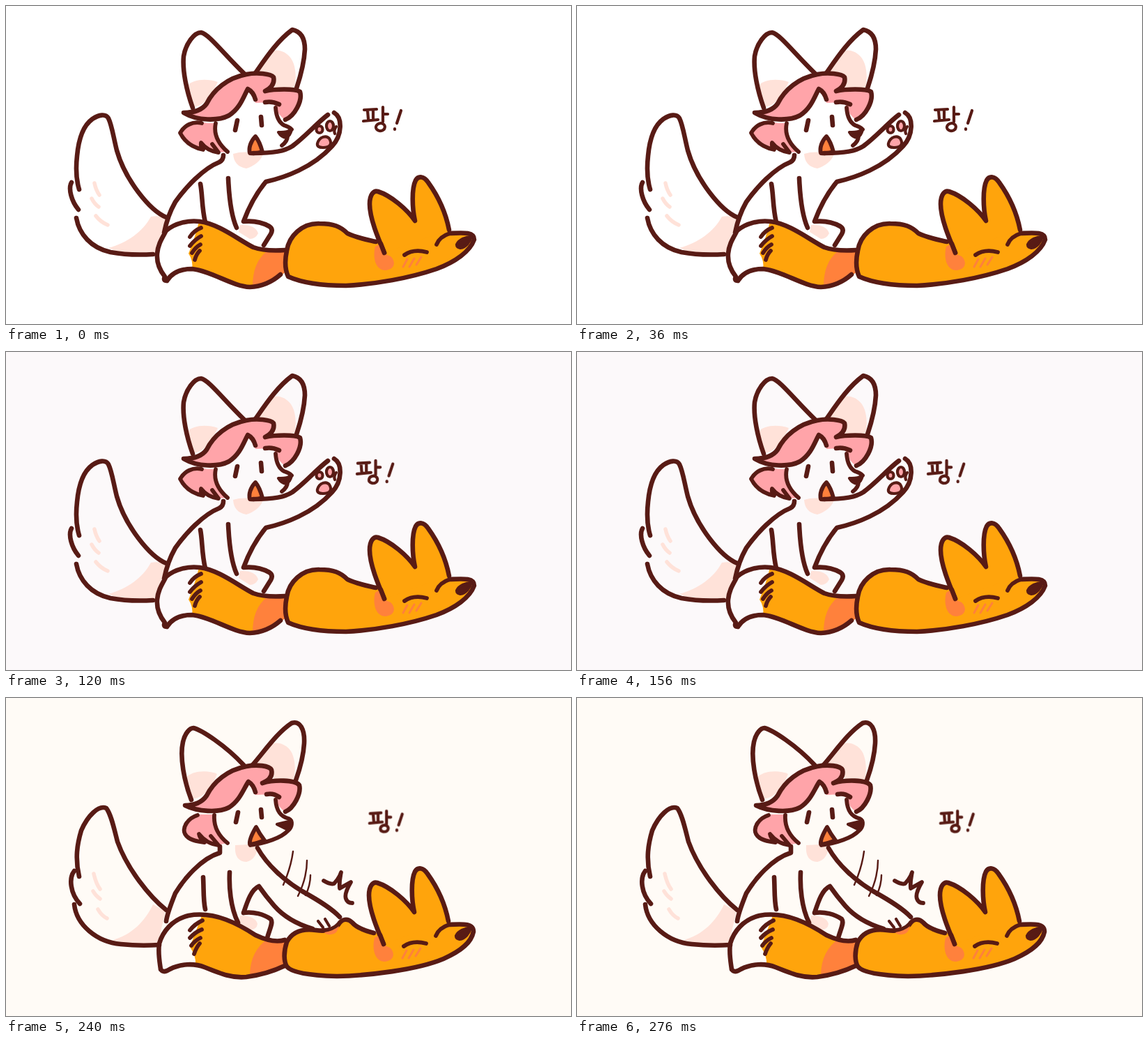
An HTML page that plays this animation: 811 px wide and 456 px high, repeating every 0.3 s.

```html
<!DOCTYPE html>
<html lang="ko">
<head>
<meta charset="utf-8">
<title>팡!</title>
<style>
html, body { margin: 0; width: 100%; height: 100%; overflow: hidden; }
svg { display: block; width: 100vw; height: 100vh; animation: paper .3s step-end infinite; }
path, ellipse { fill: none; stroke-linecap: round; stroke-linejoin: round; }
.ink { stroke: #581b15; stroke-width: 6.6; }
.mid { stroke-width: 5.8; }
.fine { stroke-width: 4.2; }
.thin { stroke-width: 2.4; }
.orange { fill: #ffa40c; }
.rust { fill: #ff813c; }
.pink { fill: #ffa4a9; }
.peach { fill: #ffe2d9; }
.dark { fill: #581b15; }
.tuft { stroke: #ffe2d9; stroke-width: 5.5; }
.blush { stroke: #ff813c; stroke-width: 3; }

.raise { animation: raise .3s step-end infinite; }
.slap { animation: slap .3s step-end infinite; }
.head { animation: nudge .3s step-end infinite; }
.word { vector-effect: non-scaling-stroke; animation: word .3s step-end infinite; }
.whoosh1 { animation: first .3s step-end infinite; }
.whoosh2 { animation: rest .3s step-end infinite; }

@keyframes paper {
  0% { background: #fff; }
  20% { background: #fcf9fd; }
  40% { background: #fcf9fa; }
  60% { background: #f9fffe; }
  80%, 100% { background: #fffbf6; }
}
@keyframes raise {
  0%, 40% { visibility: visible; }
  20%, 60%, 100% { visibility: hidden; }
}
@keyframes slap {
  0%, 40% { visibility: hidden; }
  20%, 60%, 100% { visibility: visible; }
}
@keyframes first {
  0%, 40%, 100% { visibility: hidden; }
  20% { visibility: visible; }
}
@keyframes rest {
  0% { visibility: hidden; }
  60%, 100% { visibility: visible; }
}
@keyframes nudge {
  0%, 40% { transform: none; }
  20%, 60%, 100% { transform: translate(-1px, -1px); }
}
@keyframes word {
  0% { transform: none; }
  20% { transform: translate(32.6px, 11.5px) scale(.95); }
  40% { transform: translate(16.6px, 18px) scale(.95); }
  60%, 100% { transform: translate(75.5px, 36px) scale(.87); }
}
</style>
</head>
<body>
<svg viewBox="0 0 811 456" role="img" aria-label="팡!">
  <!-- paw up -->
  <g class="raise">
    <path class="peach" d="M260 115C268 104 290 104 304 109L296 125Q285 142 270 145Z"/>
    <path class="peach" d="M376 67C390 58 408 67 413 83C417 96 416 108 414 118L384 117L386 104L358 96Z"/>
    <path class="peach" d="M326 212C338 208 355 209 369 213Q363 227 345 233Q327 230 326 212Z"/>
    <path class="peach" d="M147 347C175 339 196 324 208 302Q220 300 231 304L222 330L214 354Q170 358 147 347Z"/>
    <path class="peach" d="M336 314Q358 313 362 326Q358 334 350 334L334 324Z"/>
    <path class="tuft" d="M127 254Q129 264 134 271M123 276Q127 284 133 288M129 301Q136 310 146 314"/>

    <path class="ink" d="M268 146C259 121 253 92 255 72C258 54 270 38 280 38C291 40 312 68 342 97M358 96C372 76 389 50 411 34C421 36 429 43 429 62C428 82 422 103 417 118"/>
    <path class="ink" d="M230 303C206 293 171 249 159 207C154 187 152 171 147 161C143 154 133 156 124 162C110 172 104 193 102 215C100 233 101 250 105 263M94 253C89 262 94 280 104 292M101 304C105 327 122 347 150 353Q177 358 211 356"/>
    <path class="ink" d="M312 214Q312 221 306 224C283 233 258 260 243 281C235 295 230 310 227 325M279 255C282 270 281 290 286 310M319 247C320 270 322 298 331 318"/>

    <path class="pink" d="M290 168C275 165 255 169 250 182C257 196 268 203 283 207L281 198Q292 210 305 210L318 209C303 195 298 180 301 168Z"/>
    <path class="ink mid" d="M281 168C268 165 256 171 250 182C257 196 268 203 283 206Q279 203 280 196Q289 208 305 210L296 198M301 168C298 182 303 196 318 209"/>
    <path class="pink" d="M255 153C270 153 281 150 288 140C298 120 318 103 345 98C360 95 380 97 384 102C386 112 380 118 372 122C385 119 415 118 422 123C426 136 414 158 401 163Q390 157 387 143Q380 137 358 139Q357 123 347 119C341 130 336 147 320 157C305 165 275 165 255 153Z"/>
    <path class="ink" d="M372 122C385 119 415 118 422 123C426 136 414 158 401 163M372 138Q382 136 392 141M372 122C380 118 386 112 384 102C380 97 360 95 345 98C318 103 298 120 288 140C281 150 270 153 255 153C275 165 305 165 320 157C336 147 341 130 347 119Q355 123 358 134"/>

    <path class="ink" d="M332 164L329 178M366 159L367 171"/>
    <path class="ink mid" d="M387 146C388 160 392 167 399 171Q406 173 410 177"/>
    <path class="ink fine dark" d="M391 181Q402 182 410 177Q408 186 402 189Q395 188 391 181Z"/>
    <path class="ink mid" d="M404 187Q404 194 396 200"/>
    <path class="ink mid rust" d="M358 187C351 194 348 204 350 211Q360 212 368 209Q364 194 358 187Z"/>
    <path class="ink" d="M355 211C385 211 400 208 411 201C430 187 446 168 462 156M471 153C483 160 483 185 468 201C440 232 400 246 373 252C358 270 348 290 341 309Q362 307 378 316Q384 320 380 327L370 343"/>
    <path class="ink fine pink" d="M447 197C450 187 460 185 464 190C469 198 465 203 455 203Q446 203 447 197Z"/>
    <ellipse class="ink fine pink" cx="450" cy="177" rx="4.5" ry="5"/>
    <ellipse class="ink fine pink" cx="465" cy="172" rx="5" ry="7"/>
    <path class="ink fine" d="M474 173Q470 178 472 183"/>

    <path class="orange" d="M277 309C305 312 335 336 355 346Q372 352 403 350L402 381L394 385Q372 403 352 403C325 402 300 382 267 378Q269 365 262 355Q272 330 277 309Z"/>
    <path class="rust" d="M375 351C360 363 354 380 354 402Q374 403 402 381L403 350Z"/>
    <path class="ink" d="M231 394C239 381 252 377 267 377C295 380 325 402 350 403C372 402 385 393 394 385M231 394Q225 394 228 388C220 378 216 367 217 355C218 342 224 333 230 322C243 311 262 307 278 309C305 312 335 336 355 346Q372 352 401 350"/>
    <path class="ink mid" d="M280 318Q270 322 264 331M280 330Q271 335 264 344M279 342Q272 346 267 354M278 351Q273 356 271 364"/>
    <path class="ink orange" d="M531 338C518 335 505 333 490 326C480 316 470 312 450 312C425 311 406 330 403 351C400 365 401 379 405 388C425 397 455 401 488 401C530 399 580 390 618 377C645 367 666 352 672 335C672 324 658 325 637 326"/>
  </g>

  <!-- paw down -->
  <g class="slap">
    <path class="peach" d="M258 115C266 104 290 103 303 109L296 125Q285 142 267 145Z"/>
    <path class="peach" d="M378 67C390 60 408 68 412 83C416 95 415 108 413 118L384 117L384 102L355 96Z"/>
    <path class="peach" d="M329 211Q327 234 345 235Q358 232 361 216L352 210Z"/>
    <path class="peach" d="M153 347C180 340 200 320 211 296L229 306Q223 330 218 353Q180 356 153 347Z"/>
    <path class="peach" d="M336 312Q358 312 361 324Q360 332 350 333L334 324Z"/>
    <path class="tuft" d="M126 252Q129 266 135 274M125 277Q129 284 135 288M132 303Q137 312 145 316"/>

    <path class="ink" d="M266 146C256 120 249 85 254 63C257 50 264 43 269 43C281 46 315 68 341 96M354 96C372 75 390 49 410 36C422 32 429 45 428 65C427 83 421 104 416 118"/>
    <path class="ink" d="M230 304C206 285 174 245 160 206C155 187 151 167 144 158C133 153 117 169 108 190C102 210 99 230 105 256M98 248C90 258 92 280 106 295M98 296C101 325 130 350 165 353Q192 356 220 354"/>
    <path class="ink" d="M307 213L307 222C280 230 255 260 243 280C237 295 231 310 230 320M283 257C284 275 283 290 286 303M321 250C320 270 322 300 333 322"/>

    <path class="pink" d="M275 167C262 172 252 185 257 195C262 204 275 206 285 208Q296 213 318 208C303 195 298 180 301 167Z"/>
    <path class="ink mid" d="M275 168C262 172 252 185 257 195C262 204 275 206 285 207Q278 201 277 195Q288 209 305 211L294 198M299 168C298 182 303 196 318 208"/>
    <path class="pink" d="M257 154C270 154 281 150 288 140C298 120 318 103 345 98C360 95 378 97 381 103C383 112 378 118 370 122C385 117 415 117 421 125C424 137 413 158 401 163Q390 157 387 143Q380 137 358 139Q357 123 348 120C341 130 336 147 320 157C305 165 275 163 257 154Z"/>
    <path class="ink" d="M368 122C385 117 415 117 421 125C424 137 413 158 401 163M374 138Q384 136 392 142M368 122C378 118 383 112 381 103C378 97 360 95 345 98C318 103 298 120 288 140C281 150 270 154 257 154C275 163 305 165 320 157C336 147 341 130 348 120Q355 124 358 135"/>

    <path class="ink" d="M333 164L330 178M366 160L367 171"/>
    <path class="ink mid" d="M387 146C388 162 394 170 406 173C412 176 411 185 405 190C395 201 372 208 351 211"/>
    <path class="ink fine dark" d="M389 181L410 176Q409 184 403 188Z"/>
    <path class="ink mid rust" d="M359 185C353 195 349 205 350 210Q360 209 371 204Q364 195 359 185Z"/>

    <path class="orange" d="M281 312C310 308 335 325 358 340Q380 350 402 347L402 383Q370 398 345 400C325 402 310 396 272 382Q273 370 264 357Z"/>
    <path class="rust" d="M372 348C358 360 350 375 350 400Q380 394 402 383L402 347Z"/>
    <path class="ink" d="M222 389Q226 395 235 389C250 381 270 380 285 386C310 396 325 402 345 400Q375 396 400 384M222 389C220 375 218 365 220 352C225 335 238 318 262 312C300 305 335 325 358 340C375 348 390 350 400 347"/>
    <path class="ink mid" d="M282 319Q271 324 264 333M281 332Q271 336 264 344M279 344Q271 348 266 355M278 352Q273 358 270 367"/>
    <path class="ink orange" d="M528 337C512 333 503 329 497 322C490 315 482 317 477 325C470 333 460 335 445 333C425 330 411 335 403 350C398 365 399 378 403 385C410 394 440 398 475 399C520 398 590 390 628 374C655 362 668 350 671 335C671 323 657 324 636 325"/>
    <path class="rust" d="M457 336Q470 334 478 327Q476 338 467 339Q460 340 457 336Z"/>
    <path class="ink" d="M361 215C375 240 400 262 425 277C450 291 468 302 479 314M341 308C347 290 352 275 363 270C370 280 378 290 385 298C400 315 420 325 440 331M341 308C355 306 370 310 380 317C384 322 378 332 375 344"/>
    <path class="ink fine" d="M448 320L455 329M458 317L464 327"/>
    <path class="ink mid" d="M456 262Q466 268 471 266Q478 259 481 250Q478 264 479 273L495 264Q485 281 488 288Q490 294 497 294"/>
  </g>
  <path class="ink thin whoosh1" d="M414 214Q411 242 400 272M432 242Q427 264 417 286M440 243Q438 262 431 284"/>
  <path class="ink thin whoosh2" d="M412 220Q409 243 398 268M432 233Q432 258 419 284M437 254Q437 268 430 283"/>

  <!-- sleepy head -->
  <g class="head">
    <path class="orange" d="M590 312L635 318L637 327L625 345L540 345Z"/>
    <path class="ink orange" d="M543 354C535 335 522 305 522 284C522 270 528 264 534 266C553 272 576 292 587 308C583 290 582 262 588 250C592 243 600 244 606 253C619 271 631 295 636 321"/>
    <path class="rust" d="M530 345C526 360 530 379 545 379C560 377 559 365 552 359L543 355L537 341Z"/>
    <path class="ink" d="M543 354L538 341"/>
    <path class="ink mid" d="M572 357Q585 348 604 353M618 342Q622 331 637 326"/>
    <path class="ink fine dark" d="M647 342C650 335 660 331 668 331C666 338 660 346 652 347Q647 346 647 342Z"/>
    <path class="blush" d="M576 363L570 374M586 362L579 374M596 360L589 371"/>
  </g>

  <!-- hand lettering -->
  <path class="ink fine word" d="M514 149L532 148M519 150L520 162M527 149L527 161M513 165L534 163M541 145L541 166M542 155L548 155M538 168C530 169 528 177 536 179C545 180 547 169 538 168M567 150L561 168M558 176L558 177"/>
</svg>
</body>
</html>
```
